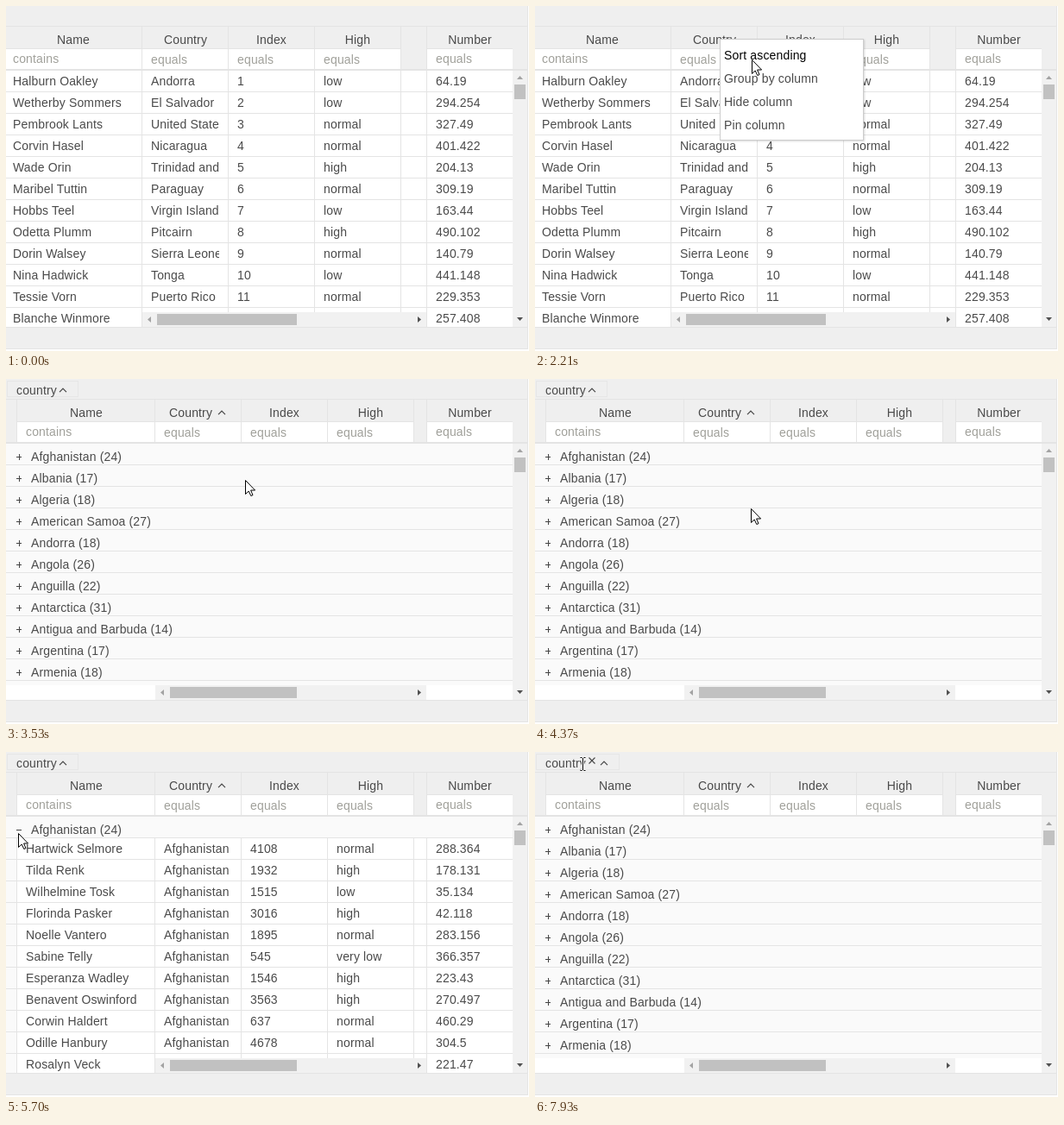
Animation, 606 px wide and 400 px high, one loop 8 s. Source, as an HTML page:

```html
<!DOCTYPE html>
<html lang="en">
<head>
<meta charset="utf-8">
<title>Grouping a data grid</title>
<style>
  html, body { margin: 0; width: 100%; height: 100%; overflow: hidden; background: #fff; }
  #stage { position: relative; width: 606px; height: 400px; overflow: hidden; }
  #stage div, #stage svg { position: absolute; }
  #stage svg { left: 0; top: 0; width: 606px; height: 400px; overflow: hidden; fill: none; }
  .layer { left: 0; top: 0; width: 606px; height: 400px; }
  .text {
    font: 14px/16px "Liberation Sans", Arial, sans-serif; font-kerning: normal;
    color: #4a4a4a; height: 16px; white-space: pre; overflow: hidden;
  }
  .hint { color: #a0a09a; }
  .hot { color: #000; }
</style>
</head>
<body>
<div id="stage"></div>
<script>
const LOOP = 8000;
const GRAY = '#efefef', LINE = '#e4e4e4', BODY = '#fafafa';
const stage = document.getElementById('stage');

function add(parent, cls) {
  const el = document.createElement('div');
  el.className = cls;
  parent.append(el);
  return el;
}

function box(parent, x, y, w, h, color) {
  const el = add(parent, '');
  el.style.cssText = `left:${x}px;top:${y}px;width:${w}px;height:${h}px;background:${color}`;
  return el;
}

// y is the baseline
function text(parent, str, x, y, cls = '', w = 0) {
  const el = add(parent, 'text ' + cls);
  el.textContent = str;
  el.style.left = x + 'px';
  el.style.top = y - 13 + 'px';
  if (w) el.style.width = w + 'px';
  return el;
}

function centered(parent, str, x, y) {
  const el = text(parent, str, x - 60, y, '', 120);
  el.style.textAlign = 'center';
}

function drawing(parent, markup) {
  const el = document.createElementNS('http://www.w3.org/2000/svg', 'svg');
  el.innerHTML = markup;
  parent.append(el);
  return el;
}

const show = (el, on) => { el.style.visibility = on ? 'inherit' : 'hidden'; };
const layer = (parent = stage) => add(parent, 'layer');

// Letter gap that gives whole-pixel glyph advances on average
function letterGap() {
  const probe = text(stage, 'Antigua and Barbuda (14)', 0, 20);
  const gap = (164 - probe.getBoundingClientRect().width) / probe.textContent.length;
  probe.remove();
  return gap;
}
stage.style.letterSpacing = letterGap().toFixed(3) + 'px';

const chevron = (x, y) =>
  `<path d="M${x - 4} ${y + 2.2}L${x} ${y - 1.8}L${x + 4} ${y + 2.2}" stroke="#444" stroke-width="1.2"/>`;

function frame() {
  box(stage, 0, 0, 605, 398, GRAY);
  box(stage, 0, 75, 587, 297, '#fff');
  box(stage, 0, 23, 605, 1, LINE);
  box(stage, 0, 372, 605, 1, LINE);
  box(stage, 0, 397, 605, 1, LINE);
  box(stage, 604, 0, 1, 398, LINE);
}

// edges: the right border of each scrolling column
function header(parent, left, edges) {
  const [name, country, index, high] = edges;
  const start = left ? left + 1 : 0;
  box(parent, start, 50, high - start, 23, '#fff');
  box(parent, 488, 50, 99, 23, '#fff');
  box(parent, 0, 73, 605, 2, LINE);
  box(parent, start, 49, high - start, 1, LINE);
  box(parent, 488, 49, 99, 1, LINE);
  for (const x of [...edges, 487]) box(parent, x, 24, 1, 49, LINE);
  if (left) box(parent, left, 24, 1, 49, LINE);

  centered(parent, 'Name', (left + name) / 2 + (left ? 1 : -.5), 44);
  text(parent, 'Country', country - (left ? 83 : 74), 44);
  if (left) drawing(parent, chevron(country - 22, 39));
  centered(parent, 'Index', index - 49.5, 44);
  centered(parent, 'High', high - 49.5, 44);
  centered(parent, 'Number', 537.5, 44);

  text(parent, 'contains', left ? 23 : 8, 66, 'hint');
  for (const x of [country, index, high]) text(parent, 'equals', x - 89, 67, 'hint');
  text(parent, 'equals', 498, 66, 'hint');
}

function rows(parent, data, first, left, edges) {
  const cols = [left ? 23 : 8, ...edges.slice(0, 3).map(x => x + 11), 498];
  for (let y = 99; y < 372; y += 25) box(parent, 0, y, 587, 1, LINE);
  const top = 75 + 25 * first;
  for (const x of [...edges, 487]) box(parent, x, top, 1, 372 - top, LINE);
  if (left) box(parent, left, top, 1, 372 - top, LINE);
  data.forEach((row, i) => row.split('|').forEach((str, c) =>
    text(parent, str, cols[c], 92 + 25 * (i + first), '', c ? 79 : 149)));
}

function scrollBar(parent, x) {
  box(parent, x, 355, 487 - x, 17, '#f1f1f1');
  box(parent, x + 17, 357, 320 - x, 13, '#c1c1c1');
  drawing(parent, `<path d="M${x + 10} 360v7l-4-3.5z" fill="#a3a3a3"/><path d="M477 360v7l4-3.5z" fill="#505050"/>`);
}

function groupRow(parent, label, i, open) {
  const y = 90 + 25 * i;
  box(parent, 0, y - 15, 587, 24, BODY);
  box(parent, 0, y + 9, 587, 1, LINE);
  box(parent, 12, y, 6, 1, '#444');
  if (!open) box(parent, 15, y - 3, 1, 7, '#444');
  text(parent, label, 29, y + 5);
}

function chip(w, icons = '') {
  const el = layer();
  const edge = box(el, 1, 2, w - 2, 17, GRAY);
  edge.style.border = '1px solid #e6e6e6';
  text(el, 'country', 12, 18);
  drawing(el, icons);
  return el;
}

const people = [
  'Halburn Oakley|Andorra|1|low|64.19',
  'Wetherby Sommers|El Salvador|2|low|294.254',
  'Pembrook Lants|United States|3|normal|327.49',
  'Corvin Hasel|Nicaragua|4|normal|401.422',
  'Wade Orin|Trinidad and Tobago|5|high|204.13',
  'Maribel Tuttin|Paraguay|6|normal|309.19',
  'Hobbs Teel|Virgin Islands|7|low|163.44',
  'Odetta Plumm|Pitcairn|8|high|490.102',
  'Dorin Walsey|Sierra Leone|9|normal|140.79',
  'Nina Hadwick|Tonga|10|low|441.148',
  'Tessie Vorn|Puerto Rico|11|normal|229.353',
  'Blanche Winmore||||257.408'
];

const members = [
  'Hartwick Selmore|4108|normal|288.364',
  'Tilda Renk|1932|high|178.131',
  'Wilhelmine Tosk|1515|low|35.134',
  'Florinda Pasker|3016|high|42.118',
  'Noelle Vantero|1895|normal|283.156',
  'Sabine Telly|545|very low|366.357',
  'Esperanza Wadley|1546|high|223.43',
  'Benavent Oswinford|3563|high|270.497',
  'Corwin Haldert|637|normal|460.29',
  'Odille Hanbury|4678|normal|304.5',
  'Rosalyn Veck|||221.47'
].map(row => row.replace('|', '|Afghanistan|'));

const groups = [
  'Afghanistan (24)', 'Albania (17)', 'Algeria (18)', 'American Samoa (27)',
  'Andorra (18)', 'Angola (26)', 'Anguilla (22)', 'Antarctica (31)',
  'Antigua and Barbuda (14)', 'Argentina (17)', 'Armenia (18)'
];

frame();

const flatEdges = [157, 257, 357, 457];
const flat = layer();
header(flat, 0, flatEdges);
rows(flat, people, 0, 0, flatEdges);
scrollBar(flat, 158);

const groupEdges = [172, 272, 372, 472];
const grouped = layer();
header(grouped, 12, groupEdges);

const closed = layer(grouped);
box(closed, 0, 350, 587, 5, BODY);
groups.forEach((label, i) => groupRow(closed, label, i, false));

const open = layer(grouped);
box(open, 0, 100, 12, 272, BODY);
rows(open, members, 1, 12, groupEdges);
groupRow(open, groups[0], 0, true);

scrollBar(grouped, 173);

// vertical scroll bar
box(stage, 587, 75, 17, 297, '#f1f1f1');
box(stage, 589, 91, 13, 17, '#c1c1c1');
drawing(stage, '<path d="M592 85h7l-3.5-4z" fill="#a3a3a3"/><path d="M592 361h7l-3.5 4z" fill="#505050"/>');

const plainChip = chip(70);
const sortChip = chip(83, chevron(66, 13));
const hoverChip = chip(97, chevron(80, 13) +
  '<path d="M62.5 6.5l7 7m0-7l-7 7" stroke="#444" stroke-width="1.1"/>');

const menu = layer();
const panel = box(menu, 214, 38, 165, 116, '#fff');
panel.style.border = '1px solid #ccc';
panel.style.boxShadow = '1px 1px 2px rgba(0,0,0,.15)';
const items = ['Sort ascending', 'Group by column', 'Hide column', 'Pin column']
  .map((str, i) => text(menu, str, 219, 62 + 27 * i));

const pointers = {
  arrow: '<path d="M.5 .5V16.5L4.2 13L6.8 18.5L9 17.6L6.6 12H11.6Z" fill="#fff" stroke="#000"/>',
  beam: ['stroke="#fff" stroke-width="3"', 'stroke="#000"'].map(s =>
    `<path d="M-2.5 -6.5H-.5M1.5 -6.5H3.5M.5 -6V8M-2.5 8.5H-.5M1.5 8.5H3.5" ${s}/>`).join(''),
  move: '<path d="M0 -11L4 -7H2V-2H7V-4L11 0L7 4V2H2V7H4L0 11L-4 7H-2V2H-7V4L-11 0L-7 -4V-2H-2V-7H-4Z" transform="translate(.5 0)" fill="#fff" stroke="#000"/>'
};
const cursor = drawing(stage, Object.values(pointers).map(p => `<g>${p}</g>`).join(''));
const shapes = Object.keys(pointers);

// [start, end, steps, path]
const moves = [
  [280, 1060, 11, [[509, 378], [400, 235], [290, 105], [235, 50], [214, 34]]],
  [1140, 1220, 2, [[214, 34], [214, 41]]],
  [1440, 1590, 3, [[214, 41], [214, 39]]],
  [1760, 1760, 1, [[214, 39], [214, 38]]],
  [1980, 2590, 9, [[214, 38], [245, 58], [262, 71], [268, 76]]],
  [3050, 3050, 1, [[268, 76], [268, 85]]],
  [3450, 3600, 3, [[268, 85], [276, 112], [280, 126]]],
  [3840, 4370, 8, [[280, 126], [277, 142], [268, 150], [250, 150]]],
  [4450, 4610, 3, [[250, 150], [180, 138], [80, 119], [30, 108]]],
  [4690, 5000, 5, [[30, 108], [20, 102], [14, 96]]],
  [5150, 5150, 1, [[14, 96], [14, 94]]],
  [7250, 7930, 10, [[14, 94], [26, 68], [48, 30], [58, 14], [55, 13]]]
];

function along(path, u) {
  const s = u * (path.length - 1);
  const i = Math.min(Math.floor(s), path.length - 2);
  return path[i].map((v, k) => Math.round(v + (path[i + 1][k] - v) * (s - i)));
}

function position(t) {
  const move = moves.filter(m => t >= m[0]).pop();
  if (!move) return null;
  const [start, end, steps, path] = move;
  if (t >= end) return path[path.length - 1];
  const k = Math.floor((t - start) / (end - start) * (steps - 1) + 1e-6);
  // the first move enters the stage, the others leave a resting place
  return along(path, move === moves[0] ? k / (steps - 1) : (k + 1) / steps);
}

function pointer(t, y) {
  if (t < 1760) return y < 49 ? 'move' : 'arrow';
  if (t >= 3050 && t < 3450) return 'beam';
  return t > 7250 && y < 22 ? 'beam' : 'arrow';
}

function render(t) {
  const at = position(t);
  const isGrouped = t >= 3450, isOpen = t >= 5700 && t < 7100;
  const onChip = t > 7250 && at[1] < 22;
  show(flat, !isGrouped);
  show(grouped, isGrouped);
  show(open, isOpen);
  show(closed, !isOpen);
  show(plainChip, t >= 3050 && !isGrouped);
  show(sortChip, isGrouped && !onChip);
  show(hoverChip, onChip);
  show(menu, t >= 1760 && t < 3050);
  items.forEach((el, i) =>
    el.classList.toggle('hot', !!at && Math.floor((at[1] - 44) / 27) === i));
  show(cursor, !!at);
  if (!at) return;
  const kind = pointer(t, at[1]);
  [...cursor.children].forEach((g, i) => {
    g.setAttribute('transform', `translate(${at})`);
    g.style.display = shapes[i] === kind ? '' : 'none';
  });
}

const began = performance.now();
function tick() {
  render((performance.now() - began) % LOOP);
  requestAnimationFrame(tick);
}
tick();
</script>
</body>
</html>
```
